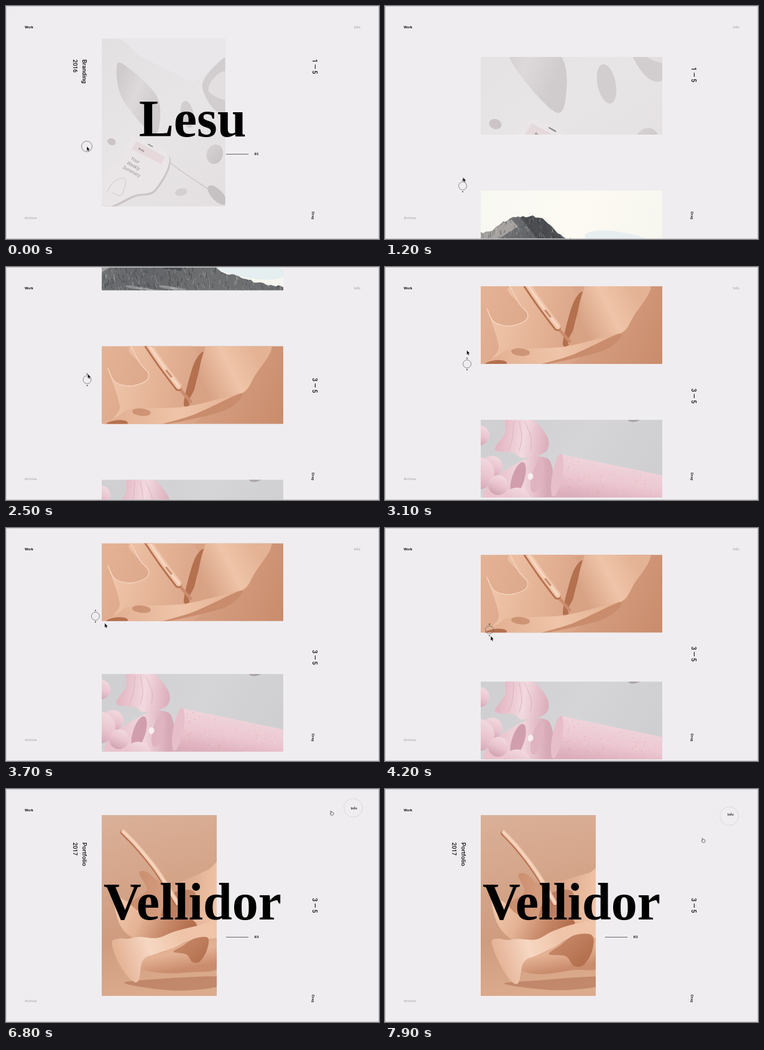
An HTML page with a canvas for the animation above (8 s loop, 600x375 px).

```html
<!DOCTYPE html>
<html lang="en">
<head>
<meta charset="utf-8">
<title>Portfolio slider</title>
<style>
html, body { margin: 0; width: 100%; height: 100%; overflow: hidden; background: #efedf0; }
canvas { display: block; width: 100vw; height: 100vh; }
</style>
</head>
<body>
<canvas id="stage"></canvas>
<script>
const W = 600, H = 375, LOOP = 8000, STEP = 215, LAG = 250;
const SERIF = '"Liberation Serif", "Times New Roman", serif';
const SANS = 'Roboto, Lato, sans-serif';
const UI = 'Inter, Roboto, sans-serif';
const INK = '#111', QUARTER = Math.PI / 2;
const DARK = '#b4704f', SHADE = '#c98c6c', MID = '#d8a285', SKIN = '#e4b295', LIGHT = '#efc4a8', PALE = '#f6d7c2';
const dpr = window.devicePixelRatio || 1;
const canvas = document.getElementById('stage');
canvas.width = W * dpr;
canvas.height = H * dpr;
const g = canvas.getContext('2d');
const glyph = document.createElement('canvas');
glyph.width = 140 * dpr;
glyph.height = 120 * dpr;
const gg = glyph.getContext('2d');

const clamp = v => Math.max(0, Math.min(1, v));
const mix = (a, b, u) => a + (b - a) * u;
const ramp = (t, a, b) => { const u = clamp((t - a) / (b - a)); return u * u * (3 - 2 * u); };
const easeOut = (t, a, b) => 1 - (1 - clamp((t - a) / (b - a))) ** 3;
const grey = v => `rgb(${v},${v},${v})`;
const seeded = s => () => (s = (s * 16807) % 2147483647) / 2147483647;

// Smooth monotone interpolation through rows of [time, value...]
function key(t, rows, c = 1) {
  const n = rows.length - 1;
  if (t <= rows[0][0]) return rows[0][c];
  if (t >= rows[n][0]) return rows[n][c];
  let i = 0;
  while (t > rows[i + 1][0]) i++;
  const slope = j => (rows[j + 1][c] - rows[j][c]) / (rows[j + 1][0] - rows[j][0]);
  const tangent = j => {
    if (j === 0 || j === n) return 0;
    const a = slope(j - 1), b = slope(j);
    return a * b <= 0 ? 0 : 2 * a * b / (a + b);
  };
  const d = rows[i + 1][0] - rows[i][0], u = (t - rows[i][0]) / d, v = 1 - u;
  return v * v * (1 + 2 * u) * rows[i][c] + u * u * (3 - 2 * u) * rows[i + 1][c]
    + d * u * v * (v * tangent(i) - u * tangent(i + 1));
}

const SCROLL = [[900, 0], [1900, 1.242], [3100, 2.437], [3600, 2.47], [4200, 2.381], [4500, 2.14], [5200, 2.042], [5700, 2]];
const CURSOR = [[0, 130, 226], [900, 125, 290], [1650, 127, 230], [1900, 129, 199], [2850, 132, 156],
  [3100, 131.5, 134], [3950, 168, 164], [4200, 170, 174], [5200, 179, 172], [6250, 586, 30],
  [6550, 534, 16], [6800, 523, 36], [7600, 511, 80]];

const scrollAt = t => key(t, SCROLL);
const openAt = t => t < 2500 ? .873 * (1 - ramp(t, -100, 800)) / (1 - ramp(0, -100, 800)) : easeOut(t, 4800, 5800);
const revealAt = t => t < 2500 ? 1 - ramp(t, 80, 650) : ramp(t, 4750, 5720);

function curve(p, closed = true) {
  const n = p.length / 2;
  const at = i => {
    const j = closed ? (i + n) % n : Math.max(0, Math.min(n - 1, i));
    return [p[2 * j], p[2 * j + 1]];
  };
  g.beginPath();
  g.moveTo(p[0], p[1]);
  for (let i = 0; i < (closed ? n : n - 1); i++) {
    const [a, b, c, d] = [at(i - 1), at(i), at(i + 1), at(i + 2)];
    g.bezierCurveTo(b[0] + (c[0] - a[0]) / 6, b[1] + (c[1] - a[1]) / 6,
      c[0] - (d[0] - b[0]) / 6, c[1] - (d[1] - b[1]) / 6, c[0], c[1]);
  }
}
function blob(p, fill) { curve(p); g.fillStyle = fill; g.fill(); }
function poly(p, fill) {
  g.beginPath();
  for (let i = 0; i < p.length; i += 2) g.lineTo(p[i], p[i + 1]);
  g.closePath();
  g.fillStyle = fill;
  g.fill();
}
function wire(p, color, width) {
  curve(p, false);
  g.strokeStyle = color;
  g.lineWidth = width;
  g.lineCap = 'round';
  g.stroke();
}
function oval(x, y, rx, ry, fill, turn = 0) {
  g.beginPath();
  g.ellipse(x, y, rx, ry, turn, 0, 7);
  g.fillStyle = fill;
  g.fill();
}
function lin(x0, y0, x1, y1, ...colors) {
  const s = g.createLinearGradient(x0, y0, x1, y1);
  colors.forEach((c, i) => s.addColorStop(i / (colors.length - 1), c));
  return s;
}
function flood(fill) { g.fillStyle = fill; g.fillRect(0, -100, W, H + 200); }
function text(str, x, y, font, color, align = 'left', angle = 0) {
  g.save();
  g.translate(x, y);
  g.rotate(angle);
  g.font = font;
  g.fillStyle = color;
  g.textAlign = align;
  g.textBaseline = 'middle';
  g.fillText(str, 0, 0);
  g.restore();
}

function drawPale() {
  flood(lin(154, 52, 353, 322, '#e3e0e2', '#e8e5e7', '#e3dfe1'));
  poly([185, 52, 353, 52, 353, 90, 300, 122, 215, 80], '#e9e7e9');
  blob([178, 100, 190, 94, 240, 140, 248, 180, 236, 205, 188, 150], lin(178, 120, 245, 150, '#cfcacc', '#ddd8da', '#d0cbcd'));
  blob([316, 128, 340, 92, 362, 86, 362, 160, 338, 168], '#d2cdcf');
  blob([326, 136, 340, 110, 358, 108, 358, 150], '#e3dfe1');
  oval(292, 174, 10, 22, '#d2cecf', -.2);
  oval(170, 218, 7, 5.5, '#cbc5c7', .3);
  oval(336, 238, 13, 16, lin(322, 225, 350, 250, '#d8d3d5', '#c6c1c3'), .3);
  oval(282, 299, 10, 6, '#d4cfd1', -.2);
  oval(340, 304, 20, 9, '#c6c1c3', .8);
  wire([244, 235, 275, 260, 325, 294], '#cac4c6', 1.4);
  const phone = [207, 212, 262, 241, 240, 294, 206, 304, 160, 322, 156, 278, 188, 242];
  blob(phone.map((v, i) => v + (i % 2 ? 3 : 2)), '#cbc5c7');
  blob(phone, '#eae6e8');
  poly([210, 217, 256, 242, 250, 254, 202, 230], '#e6d9dc');
  wire([162, 300, 174, 282, 192, 278, 186, 304, 172, 300], '#cbc6c8', 1);
  wire([229, 222, 236, 226], '#8e898b', 1.5);
  text('lesu', 218, 231, 'bold 5px ' + UI, '#777', 'center', .48);
  ['Your', 'Weekly', 'Summary'].forEach((s, i) =>
    text(s, 208 - i * 3, 248 + i * 9, 'italic 7.5px ' + SANS, '#969193', 'center', .5));
}

function drawPeak() {
  flood(lin(154, 72, 446, 197, '#f8f8f3', '#fcfaf2', '#f6f5ef'));
  oval(385, 158, 65, 18, 'rgba(216,232,240,.55)', .2);
  const rnd = seeded(73);
  const crest = [[154, 141], [214, 113], [246, 114], [286, 146], [325, 156], [360, 171], [446, 191]];
  const ridge = [446, 200, 154, 200];
  for (let x = 154; x <= 446; x += 4) ridge.push(x, key(x, crest) + rnd() * 4 - 2);
  g.save();
  poly(ridge, lin(154, 114, 300, 200, '#77787a', '#626467', '#6d6f71'));
  g.clip();
  poly([214, 110, 246, 110, 287, 148, 282, 166, 254, 162], '#4b4d50');
  poly([154, 138, 203, 118, 214, 130, 154, 168], '#a5a29f');
  for (let i = 0; i < 700; i++) {
    const x = 150 + rnd() * 296, y = 112 + rnd() * 86;
    g.strokeStyle = rnd() < .55 ? 'rgba(38,40,43,.4)' : 'rgba(190,190,188,.38)';
    g.lineWidth = .5 + rnd() * .9;
    g.beginPath();
    g.moveTo(x, y);
    g.lineTo(x + (rnd() - .35) * 6, y + 2 + rnd() * 7);
    g.stroke();
  }
  for (let i = 0; i < 5; i++) oval(205 + i * 18, 192 + (i % 3) * 3, 13, 2.4, 'rgba(220,220,220,.35)', .15);
  g.restore();
}

function drawPen(p, width) {
  const body = p.slice(0, -2);
  wire(p.slice(-4), SHADE, width * .4);
  wire(body, DARK, width);
  g.save();
  g.translate(width * .08, -width * .12);
  wire(body, LIGHT, width * .8);
  wire(body, PALE, width * .3);
  g.restore();
}

function drawFold() {
  flood(lin(154, 43, 446, 168, SKIN, MID, SHADE));
  const rim = [164, 79, 174, 99, 190, 106, 207, 106, 226, 98, 229, 86, 216, 71, 201, 43];
  blob([...rim, 292, 36, 330, 120, 290, 172, 172, 172, 183, 140], lin(175, 90, 320, 120, LIGHT, SKIN, MID));
  wire(rim, PALE, 1.3);
  blob([318, 53, 306, 100, 297, 135, 286, 134, 302, 72], DARK);
  blob([318, 53, 335, 36, 425, 38, 400, 91, 375, 121, 298, 137, 306, 105], lin(315, 100, 405, 55, MID, LIGHT, SKIN));
  blob([154, 174, 184, 153, 204, 144, 290, 140, 378, 119, 300, 154, 215, 174], lin(184, 155, 370, 125, SKIN, LIGHT, SKIN));
  oval(218, 149, 15, 6, 'rgba(180,112,79,.5)', .1);
  blob([240, 172, 300, 154, 378, 119, 350, 147], SHADE);
  oval(178, 168, 18, 6, DARK, -.1);
  drawPen([224, 35, 250, 73, 277, 109, 297, 132], 12);
  wire([258, 82, 266, 92], SHADE, 3);
}

// One flower, bent by slow waves; the right lobe sinks and the hollow opens
function drawBloom(t) {
  const age = clamp((t - 5200) / 2700), lift = mix(-28, 2, ramp(t, 5200, 7900));
  const bend = p => p.map((v, i) => {
    const x = p[i - i % 2], y = p[i - i % 2 + 1];
    return i % 2
      ? v + 2 * Math.sin(x / 26 + age * 5) + lift * clamp((x - 250) / 90) * clamp((195 - y) / 60)
      : v + 2 * Math.sin(y / 30 + age * 4);
  });
  const swell = (p, cx, cy, s) => p.map((v, i) => i % 2 ? mix(cy, v, s) : mix(cx, v, s));

  flood(lin(170, 42, 230, 333, '#dab098', '#d5a68b', '#cf9c7f', '#dcab8d'));
  blob(bend([190, 314, 245, 306, 345, 303, 345, 318, 270, 323]), 'rgba(170,104,76,.5)');
  blob(bend([224, 165, 213, 138, 226, 135, 245, 149, 272, 150, 300, 143, 325, 136, 346, 130, 346, 215, 290, 225, 205, 208, 196, 188]),
    lin(205, 150, 340, 165, SHADE, MID, LIGHT));
  blob(bend([262, 170, 300, 165, 305, 200, 285, 220, 250, 212]), 'rgba(160,92,64,.5)');
  blob(bend([172, 176, 192, 182, 225, 204, 292, 206, 305, 225, 253, 254, 210, 244, 184, 220]),
    lin(185, 190, 285, 240, LIGHT, SKIN, SHADE, DARK));
  blob(bend([205, 250, 255, 250, 300, 238, 346, 224, 346, 286, 300, 293, 248, 296, 213, 287]),
    lin(250, 240, 260, 295, MID, SKIN, SHADE));
  drawPen(bend([190, 71, 208, 90, 226, 112, 245, 138, 274, 184, 293, 208]), 8.5);
  blob(bend([172, 248, 183, 242, 197, 243, 215, 240, 245, 240, 272, 228, 307, 219, 346, 214, 346, 239, 300, 241, 272, 254, 245, 265, 222, 277, 213, 310, 201, 309, 183, 282]),
    lin(180, 275, 335, 225, SKIN, PALE, LIGHT, LIGHT));
  const hole = [263, 265, 282, 252, 306, 237, 334, 237, 333, 262, 318, 285, 302, 286, 290, 270];
  blob(bend(swell(hole, 300, 246, mix(.5, 1, ramp(t, 5600, 7900)))), lin(270, 240, 310, 285, SHADE, DARK));
}

function drawPink() {
  flood(lin(200, 247, 400, 372, '#d0d0d2', '#d5d5d7', '#cfcfd1'));
  oval(402, 245, 11, 5, '#aaa4a8', -.2);
  const ball = (x, y, r) => oval(x, y, r, r, lin(x + r * .5, y - r, x - r * .4, y + r, '#f3dbe1', '#e9c4cf', '#cfa1b0'));
  ball(152, 272, 16);
  ball(172, 322, 17);
  ball(150, 333, 26);
  blob([196, 244, 193, 268, 177, 295, 207, 300, 220, 308, 248, 304, 262, 293, 260, 272, 234, 244],
    lin(185, 270, 262, 280, '#e3b7c4', '#f2d9df', '#dcaebb'));
  for (let i = 0; i < 3; i++) wire([207 + i * 9, 250, 205 + i * 15, 276, 198 + i * 18, 296], '#d9abb9', .8);
  blob([165, 378, 172, 345, 222, 312, 250, 306, 268, 320, 265, 378], lin(180, 340, 262, 340, '#e9c2cd', '#f1d6dd', '#d7a8b6'));
  oval(214, 342, 10, 28, '#d19eae', .3);
  oval(245, 338, 9, 27, '#dfb3c0', .25);
  ball(182, 352, 16);
  ball(212, 378, 22);
  oval(234, 338, 4.5, 5.5, '#f6edf0', .2);
  poly([282, 302, 450, 337, 450, 376, 267, 376, 270, 335], lin(350, 315, 340, 375, '#efd3da', '#ecc7d1', '#dcaebb'));
  oval(277, 336, 8, 35, '#e6bfca', .18);
  const rnd = seeded(19);
  for (let i = 0; i < 110; i++) {
    const x = 286 + rnd() * 160, y = 305 + (x - 282) * .21 + rnd() * 65;
    oval(x, y, .7, .5, rnd() < .5 ? '#d99f8f' : '#f7e7e2');
  }
}

// Paints a w x h picture centred on cx, cy so that it covers the box
function cover(box, cx, cy, w, h, paint) {
  const k = Math.max(box.w / w, box.h / h);
  g.save();
  g.translate(box.x + box.w / 2, box.y + box.h / 2);
  g.scale(k, k);
  g.translate(-cx, -cy);
  paint();
  g.restore();
}

function drawItem(k, t, pos, p, active) {
  const box = { x: 154, y: 125 + (k - pos) * STEP, w: 292, h: 125 };
  if (k === active) {
    box.w -= 107 * p;
    box.h += 166 * p;
    box.y -= 83 * p;
  } else {
    box.w *= 1 - p;
    box.y += Math.sign(k - active) * 51 * p;
  }
  // The next slide lags behind while the list is pulled back
  if (k === 3) box.y -= 11 * ramp(t, 3300, 4200) * (1 - ramp(t, 4200, 4600));
  if (box.w < 1 || box.y > H || box.y + box.h < 0) return;
  g.save();
  g.beginPath();
  g.rect(box.x, box.y, box.w, box.h);
  g.clip();
  if (k === 0) cover(box, 253.5, 187, 199, 270, drawPale);
  if (k === 1) cover(box, 300, 134.5, 292, 125, drawPeak);
  if (k === 2) {
    const tall = k === active ? ramp(p, .2, .6) : 0;
    if (tall < 1) cover(box, 300, 105.5, 292, 125, drawFold);
    g.globalAlpha = tall;
    if (tall > 0) cover(box, 246.5, 187.5, 185, 291, () => drawBloom(t));
  }
  if (k === 3) cover(box, 300, 309.5, 292, 125, drawPink);
  g.restore();
}

// Letters grow out of their thick strokes: each is thinned, then spread sideways again
function drawTitle(word, q, base) {
  if (q <= 0) return;
  const font = `bold 84px ${SERIF}`;
  g.font = font;
  g.textAlign = 'left';
  g.textBaseline = 'alphabetic';
  g.fillStyle = '#000';
  const wide = s => g.measureText(s).width;
  const left = 300 - wide(word) / 2;
  [...word].forEach((ch, i) => {
    const x = left + wide(word.slice(0, i + 1)) - wide(ch) - 4.5 * (1 - q) * i;
    const thin = 6.5 * (1 - clamp(1.62 * q - .62 * i / (word.length - 1)));
    if (thin < .05) return g.fillText(ch, x, base);
    gg.setTransform(dpr, 0, 0, dpr, 0, 0);
    gg.globalCompositeOperation = 'source-over';
    gg.clearRect(0, 0, 140, 120);
    gg.font = font;
    gg.fillText(ch, 30, 90);
    gg.globalCompositeOperation = 'destination-out';
    gg.lineWidth = thin * 2;
    gg.lineJoin = 'round';
    gg.strokeText(ch, 30, 90);
    const copies = Math.ceil(thin * 3);
    for (let j = 0; j <= copies; j++) {
      g.drawImage(glyph, x - 30 + thin * (2 * j / copies - 1), base - 90, 140, 120);
    }
  });
}

function drawCaption(kind, year, num, a) {
  if (a <= 0) return;
  g.globalAlpha = a;
  text(kind, 126, 86, '500 9.7px ' + SANS, INK, 'left', QUARTER);
  text(year, 111, 86, '500 9.2px ' + SANS, INK, 'left', QUARTER);
  g.fillStyle = '#444';
  g.fillRect(354, 238, 36 * a, .8);
  text(num, 399.5, 238.5, 'bold 7px ' + SERIF, INK);
  g.globalAlpha = 1;
}

function drawPointer(t) {
  const at = (time, c) => key(time, CURSOR, c);
  const hover = ramp(t, 5900, 6300);
  // The ring trails the pointer, then sticks to the link with a slight pull
  const trail = (c, rest) => mix(at(t - LAG, c), rest + .21 * (at(t - LAG, c) - rest), hover);
  const rx = trail(1, 565), ry = trail(2, 34);
  const drag = ramp(t, 750, 1050) * (1 - ramp(t, 4350, 4650));
  g.beginPath();
  g.arc(rx, ry, 8.5 - 2 * drag + 6.5 * hover, 0, 7);
  g.strokeStyle = grey(Math.round(mix(95, 208, hover)));
  g.lineWidth = .7;
  g.stroke();
  g.globalAlpha = drag;
  for (const s of [-1, 1]) oval(rx, ry + 9.3 * s, .9, .9, '#222');
  g.globalAlpha = 1;
  text('Info', 565 + .8 * hover * (rx - 565), 34.5 + .8 * hover * (ry - 34.5),
    '600 5.4px ' + UI, grey(Math.round(mix(172, 25, hover))), 'center');

  g.save();
  g.translate(at(t, 1), at(t, 2));
  if (hover < .8) {
    poly([0, 0, 0, 7.2, 1.6, 5.8, 2.7, 8.2, 4, 7.6, 2.9, 5.3, 5, 5.1], INK);
    g.strokeStyle = 'rgba(255,255,255,.8)';
    g.lineWidth = .4;
  } else {
    g.scale(.9, .9);
    poly([-1.2, -.5, -.2, -.7, .6, 1.6, 2, 1.2, 4.2, 2.2, 4.4, 4.5, 3.4, 6.6, 0, 6.8, -1.9, 4.4, -1.6, 3.4, -.4, 3.8], '#eee');
    g.strokeStyle = '#444';
    g.lineWidth = .8;
  }
  g.stroke();
  g.restore();
}

function draw(t) {
  const pos = scrollAt(t), p = openAt(t), active = t < 2500 ? 0 : 2;
  g.setTransform(dpr, 0, 0, dpr, 0, 0);
  g.globalAlpha = 1;
  g.fillStyle = '#efedf0';
  g.fillRect(0, 0, W, H);

  for (let k = 0; k < 4; k++) drawItem(k, t, pos, p, active);
  drawTitle(active ? 'Vellidor' : 'Lesu', revealAt(t), 210 + (active - pos) * STEP);
  if (active) drawCaption('Portfolio', '2017', '03', ramp(t, 5500, 6200));
  else drawCaption('Branding', '2016', '01', 1 - ramp(t, 60, 450));

  text('Work', 30, 34.5, '700 5.3px ' + UI, INK);
  text('Archive', 30, 341, '500 5.4px ' + UI, '#aaa8ab');
  text('Drag', 494, 331, '600 5.3px ' + UI, INK, 'left', QUARTER);
  text(`${Math.round(pos) + 1} — 5`, 495.5, 97.5 + 45 * scrollAt(t + 70), '500 10px ' + SANS, INK, 'center', QUARTER);
  drawPointer(t);
  g.strokeStyle = '#c8c6c9';
  g.lineWidth = 1;
  g.strokeRect(.5, .5, W - 1, H - 1);
}

const start = performance.now();
function tick(now) {
  draw(Math.max(0, now - start) % LOOP);
  requestAnimationFrame(tick);
}
draw(0);
requestAnimationFrame(tick);
</script>
</body>
</html>
```
